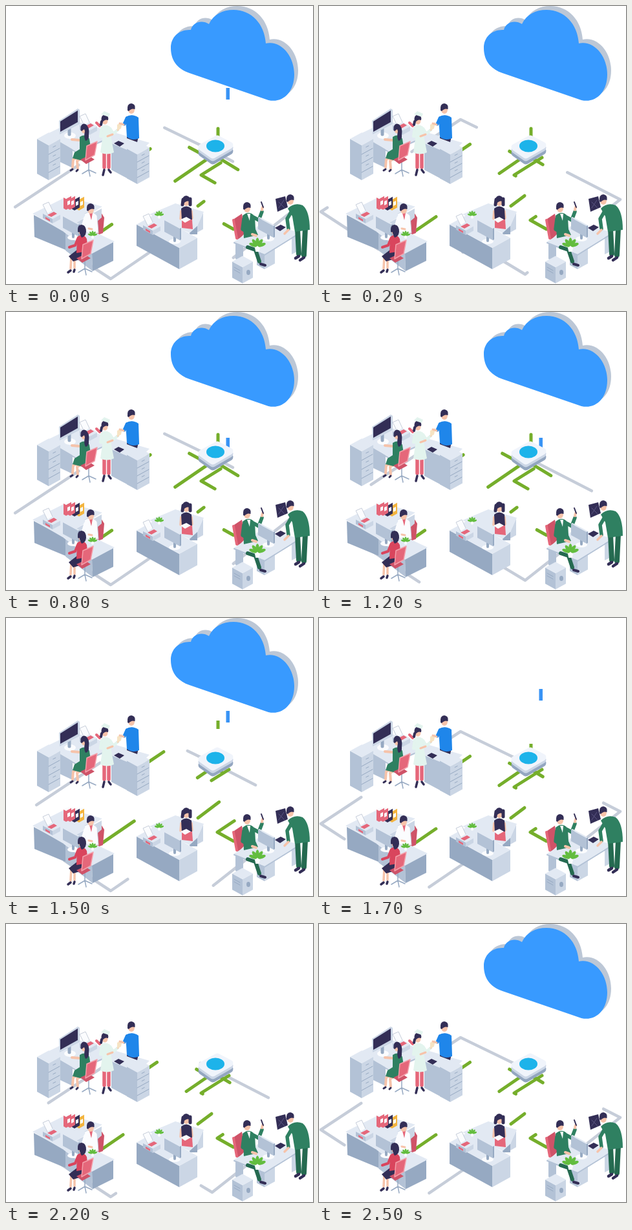
An HTML page that plays this animation: 475 px wide and 431 px high, repeating every 2600 ms.

```html
<!DOCTYPE html>
<html lang="en">
<head>
<meta charset="utf-8">
<title>Cloud office</title>
<style>
html, body { margin: 0; width: 100%; height: 100%; overflow: hidden; background: #fff; }
svg { display: block; width: 475px; height: 431px; }
.line { fill: none; stroke-linecap: round; stroke-linejoin: round; }
</style>
</head>
<body>
<svg id="stage" viewBox="0 0 475 431"></svg>
<script>
const C = {
  top: '#e2e9f3', lit: '#cbd6e5', mid: '#b3c2d6', dark: '#96a9c2', navy: '#332e56',
  red: '#e5677a', rose: '#cf5368', skin: '#f6c3aa', green: '#2f8061', deep: '#256a50',
  blue: '#1f86ea', wire: '#c6cdd9', lime: '#75ae2b', leaf: '#63bd3f', white: '#fbfcfe', mint: '#e3f4ee'
};
const poly = (c, pts) => `<polygon points="${pts}" fill="${c}"/>`;
const oval = (c, x, y, rx, ry = rx) => `<ellipse cx="${x}" cy="${y}" rx="${rx}" ry="${ry}" fill="${c}"/>`;
const limb = (c, w, d, more = '') => `<path class="line" d="${d}" stroke="${c}" stroke-width="${w}" ${more}/>`;
const shape = (c, d, more = '') => `<path d="${d}" fill="${c}" ${more}/>`;
const at = (x, y, art) => `<g transform="translate(${x} ${y})">${art}</g>`;

// Isometric box: near top corner, reach to the left and right, height
function box(x, y, a, b, h, left = C.mid, right = C.lit, top = C.top) {
  const k = .55, ly = y - k * a, ry = y - k * b;
  return poly(left, [x, y, x - a, ly, x - a, ly + h, x, y + h]) +
    poly(right, [x, y, x + b, ry, x + b, ry + h, x, y + h]) +
    poly(top, [x, y, x - a, ly, x - a + b, ly - k * b, x + b, ry]);
}
const drawers = (x, y, w, step) => [1, 2, 3].map(i =>
  limb(C.dark, 1, `M${x},${y + step * i}l${w},${-w * .55}m${-w * .6},${w * .3 - step / 2}l4,-2`)).join('');
const head = (x, y, r = 5.5) => oval(C.skin, x, y + 2, r - 1, r) +
  shape(C.navy, `M${x - r},${y + 3}Q${x - r - 1},${y - r - 2} ${x},${y - r - 2}Q${x + r + 1},${y - r - 1} ${x + r - .5},${y + 1}Q${x},${y - 1} ${x - r + 2},${y + 4}Z`);
const printer = (x, y) => at(x, y,
  box(2, 7, 15, 12, 7) + poly(C.white, '-13,-15 -4,-19 2,-6 -6,-1') + limb(C.wire, 1, 'M-6,-1L-13,-15L-4,-19L2,-6') +
  poly(C.red, '-6,1 4,-4 9,-1 0,4') + poly(C.red, '-9,4 -2,8 -2,11 -9,7'));
const screen = (x, y) => at(x, y,
  oval(C.white, 3, 17, 9, 4) + limb(C.dark, 4, 'M3,8V16') +
  poly(C.mid, '-13,-16 11,-3 11,15 -13,2') + poly(C.top, '-13,-16 -11,-17 13,-4 11,-3') + poly(C.dark, '11,-3 13,-4 13,14 11,15'));
const plant = (x, y, k) => `<g transform="translate(${x} ${y}) scale(${k})">` + poly(C.white, '-5,2 5,2 3,11 -3,11') +
  Array.from({length: 5}, (_, i) => `<ellipse cy="-6" rx="3" ry="7" fill="${C.leaf}" transform="rotate(${i * 35 - 70} 0 2)"/>`).join('') + '</g>';
const chair = (x, y) => at(x, y,
  limb(C.dark, 1.5, 'M-2,20V37M-12,41L-2,35L9,40M-2,35L0,45') +
  poly(C.rose, '-15,19 -2,13 7,19 -6,26') + poly(C.red, '-5,-2 11,-9 7,12 -7,20') + limb('#f3a0ab', 1.5, 'M-5,-2L11,-9L7,12L-7,20Z'));

const officeOne = () =>
  poly(C.mid, '84,212 103,221 103,251 84,242') + poly(C.mid, '163,212 189,222 189,268 163,254') +
  poly(C.top, '62,199 106,178 222,212 203,230 150,208 109,226 84,211') + limb(C.mid, 2, 'M84,212L109,227L150,209L189,225') +
  box(66, 216, 18, 18, 54) + drawers(66, 216, 17, 14) + box(203, 230, 16, 19, 46) + drawers(203, 230, 18, 12) +
  oval(C.white, 99, 201, 9, 5) + limb(C.dark, 5, 'M98,188V199') +
  poly(C.lit, '82,178 111,159 114,161 114,183 83,199') + poly(C.navy, '84,179 111,162 111,180 84,195') +
  printer(127, 186) + limb(C.red, 4, 'M140,181L145,186') + poly(C.navy, '167,213 174,209 183,213 176,218') +
  limb(C.skin, 4, 'M114,208L102,207M112,234L104,238L103,250M117,236L110,240L111,252') + limb(C.navy, 3, 'M103,253l-3,2M111,254l-2,2') +
  shape(C.green, 'M114,203Q124,197 129,206L132,226L119,240L103,236L106,227L114,222Z') +
  head(121, 190) + shape(C.navy, 'M119,185Q130,183 128,199Q129,208 123,209Q120,204 122,194Z') + chair(130, 219) +
  limb(C.red, 5.5, 'M152,226V250M159,226V250') + limb(C.navy, 3.5, 'M152,254l-2,8M159,254l3,4') +
  shape(C.mint, 'M147,187Q154,182 161,187L163,206L167,227Q156,232 146,227L149,206Z') +
  limb(C.mint, 4.5, 'M148,190L146,202L157,202M161,190L166,198L173,192') + limb(C.skin, 3, 'M173,192L176,187M157,202L165,199') +
  head(153, 176) + poly(C.mint, '147,168 152,163 161,167 159,172') + limb(C.navy, 4, 'M148,179L147,184') + poly('#f6e3c3', '172,184 180,180 178,190 172,193') +
  poly(C.navy, '187,198 205,202 203,211 187,205') +
  shape(C.blue, 'M185,172Q195,166 205,173L206,205Q196,210 187,203Z') + limb(C.blue, 5, 'M187,174L183,183') + limb(C.skin, 3, 'M182,184L176,182') + head(194, 159, 6);

const binder = (x, y, c) => box(x, y, 4, 8, 17, c, c, C.white) + poly(C.white, [x + 2, y + 4, x + 6, y + 2, x + 6, y + 8, x + 2, y + 10]);
const officeTwo = () =>
  poly(C.rose, '138,324 147,320 152,328 150,352 139,356') +
  poly(C.dark, '43,324 92,350 92,378 44,358') + poly(C.lit, '92,345 148,314 148,328 92,376') +
  poly(C.top, '41,322 95,295 149,311 107,337 91,351') +
  poly(C.mid, '92,352 133,383 134,411 92,379') + poly(C.dark, '133,383 166,366 166,395 134,411') + poly(C.top, '89,350 111,338 168,365 133,384') +
  binder(113, 300, '#f3b43f') + binder(106, 300, C.navy) + binder(99, 299, C.red) + binder(93, 299, C.red) +
  printer(70, 323) +
  shape(C.white, 'M122,322Q132,315 141,325L143,352L123,350Z') + limb(C.lit, 1, 'M122,322Q132,315 141,325L143,352') + poly(C.red, '129,321 134,321 132,332') +
  limb(C.white, 5, 'M123,328L119,342L129,345') + limb(C.skin, 3, 'M128,345L133,346') + head(131, 314, 6) +
  screen(101, 342) + plant(134, 355, .5) +
  limb(C.skin, 3.5, 'M112,385L101,388L100,407M116,387L106,392L106,406') + limb(C.navy, 3.5, 'M100,410l-4,3M106,409l-1,3') +
  shape(C.navy, 'M110,378L126,378L124,390L104,396L97,388Z') +
  shape('#d9455d', 'M110,358Q119,351 125,361L127,380L109,383Z') + limb('#d9455d', 4, 'M111,361L107,371L98,374') +
  head(117, 347, 6) + shape(C.navy, 'M113,341Q124,337 124,350Q123,358 117,359Q113,354 113,341Z') + chair(124, 372);

const officeThree = () =>
  poly(C.dark, '284,336 296,341 296,354 284,354') + poly(C.lit, '296,341 305,320 305,346 296,351') + poly(C.top, '222,323 262,306 306,319 296,341 284,352') +
  box(268, 375, 66, 28, 33, C.dark) + printer(225, 341) + plant(237, 324, .5) +
  limb(C.skin, 3.5, 'M271,318L270,330L281,329M287,318L288,329L277,333') +
  shape(C.navy, 'M271,314Q279,307 287,314L288,332L272,332Z') + poly(C.red, '272,331 288,331 289,346 272,344') +
  head(279, 302, 6) + limb(C.navy, 5, 'M274,300L273,308M285,299L285,308') +
  screen(258, 348) + poly(C.white, '270,331 279,327 286,331 277,336');

const officeFour = () =>
  poly(C.rose, '353,330 365,322 370,352 358,364') + limb(C.red, 4, 'M352,332L357,360') +
  poly(C.mid, '355,368 367,373 367,398 355,392') + poly(C.lit, '442,358 452,352 452,380 442,385') + box(400, 384, 12, 16, 24) +
  poly(C.top, '352,366 398,336 454,351 400,385') + limb(C.mid, 2, 'M353,367L400,386L453,353') +
  limb(C.deep, 6, 'M374,374L386,378L392,396') + limb(C.navy, 4, 'M394,400l7,2') +
  shape(C.green, 'M366,325Q376,316 385,326L386,346L390,355L368,360Z') + limb(C.green, 5.5, 'M384,328L391,332L396,319M368,330L366,346L380,354') +
  poly(C.white, '373,322 378,322 377,333') + limb(C.skin, 4, 'M396,316L397,312M381,354L387,356') + limb(C.navy, 2, 'M395,304L398,312') + head(373, 312, 6) +
  screen(403, 344) + poly(C.navy, '416,344 425,339 433,343 424,349') + plant(389, 371, .9) +
  poly(C.navy, '417,299 432,295 436,312 420,319') + limb('#5b5682', 1, 'M422,304L431,313M422,313L430,301') +
  limb(C.deep, 8, 'M463,345L461,386M451,345L453,384') + limb(C.navy, 4.5, 'M453,388l-5,3M461,390l-6,4') +
  shape(C.green, 'M436,314Q446,304 459,309Q470,318 470,347L447,350L443,326Z') + limb(C.green, 5.5, 'M442,318L435,330L437,345') + limb(C.skin, 3.5, 'M437,347L431,353') + head(440, 300, 6) +
  box(366, 405, 16, 16, 25) + oval(C.dark, 375, 413, 3, 4) + limb(C.dark, 1, 'M353,405l9,5M353,409l9,5');

const slab = (c, dy) => `<polygon points="303,219 327,206 346,216 320,231" transform="translate(0 ${dy})" fill="${c}" stroke="${c}" stroke-width="11" stroke-linejoin="round"/>`;
const router = slab('#93a6c0', 9) + slab('#cbd6e6', 4) + slab('#f0f4fb', 0) + oval('#1db3ea', 324, 217, 14, 9.5);

const cloud = 'M284,104C263,97 255,82 255,65C255,47 269,36 286,37C289,25 303,21 314,28C321,13 335,6 352,6C380,6 400,28 402,58C426,53 446,78 446,106C446,134 428,151 406,146Z';
const ring = 'M322,226L219,176L3,319L162,423L241,369L319,416L466,300Z';
const branches = [
  'M215,227L252,202L322,240',
  'M150,348L322,230',
  'M297,310L366,258L315,227',
  'M352,346L327,332L372,302L302,262L345,235'
];

document.getElementById('stage').innerHTML =
  limb(C.wire, 4.5, ring, 'id="ring" pathLength="1100" stroke-dasharray="118 157"') +
  `<g id="green">${branches.map(d => limb(C.lime, 5, d, 'pathLength="100" stroke-dasharray="28 57"')).join('')}</g>` +
  limb(C.lime, 5, 'M328,190V207', 'id="stub"') +
  `<rect id="down" x="325.5" width="5" height="13" fill="${C.lime}"/><rect id="up" x="340.5" width="5.5" height="18" fill="#3994f5"/>` +
  router + officeOne() + officeTwo() + officeThree() + officeFour() +
  `<g id="cloud">${shape('#bcc7d6', cloud, 'transform="translate(6 -6)"')}${shape('#389aff', cloud)}</g>`;

const $ = id => document.getElementById(id);
const show = (id, on) => { $(id).style.display = on ? '' : 'none'; };
const ease = (x, n) => x < .5 ? (2 * x) ** n / 2 : 1 - (2 - 2 * x) ** n / 2;
const cycle = (t, length) => (t / length % 1 + 1) % 1;

// t counts tenths of a second within the loop
function draw(t) {
  // Each cycle carries every dash to the place of the next one
  $('ring').setAttribute('stroke-dashoffset', 100 - 275 * ease(cycle(t + 2.8, 8), 2));
  $('green').setAttribute('stroke-dashoffset', 10 - 85 * ease(cycle(t - 1.5, 4), 5));
  const climb = t < 4 ? t + 4 : Math.max(0, t - 12);
  $('up').setAttribute('y', 195 - 17 * climb);
  $('down').setAttribute('y', 105 + 18 * (t - 12));
  show('up', t < 19);
  show('down', t >= 12 && t < 19);
  show('stub', t < 14);
  show('cloud', t < 17 || t >= 25);
}
function tick() {
  draw(Math.floor(performance.now() % 2600 / 100));
  requestAnimationFrame(tick);
}
tick();
</script>
</body>
</html>
```
